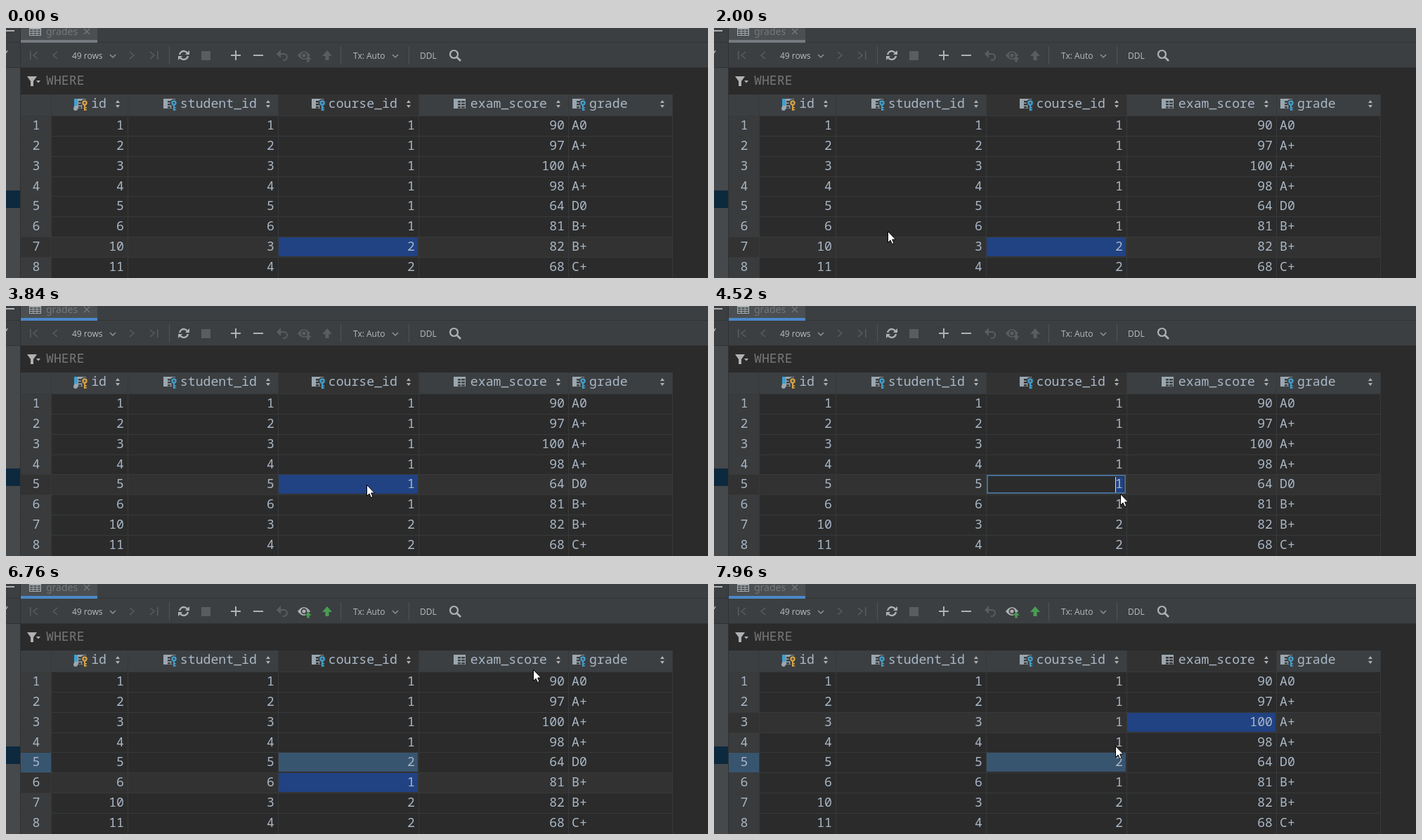
These frames come from a looping animation (999x357 px, 8000 ms). An HTML page with a canvas:

```html
<!DOCTYPE html>
<html lang="en">
<head>
<meta charset="utf-8">
<title>Grades table</title>
<style>
html, body { margin: 0; width: 100%; height: 100%; overflow: hidden; background: #2b2b2b; }
canvas { display: block; }
</style>
</head>
<body>
<canvas id="stage" width="999" height="357"></canvas>
<script>
const c = document.getElementById('stage').getContext('2d');
const LOOP = 8000, STEP = 40;
const MONO = '18.2px "Noto Sans Mono", monospace', CHAR = 10.92;
const UI = '12px "Open Sans", sans-serif';
const TAB = '14px "Noto Sans", sans-serif';
const LIGHT = '#afb1b3', DIM = '#5a5d5f', TEXT = '#a9b7c6', GREEN = '#499c54';
const PANEL = '#3c3f41', GRID = '#2b2b2b', LINE = '#37393a', ACTIVE = '#323232';
const SELECTED = '#214283', CHANGED = '#385570', CARET = '#dddddd';
const GOLD = '#d9a343', BLUE = '#40a0cf', STEEL = '#9aa7b0', TAB_BACK = '#4b4f51';

// Columns run from the previous right edge to their own
const columns = [
  { name: 'id', right: 173, key: GOLD },
  { name: 'student_id', right: 387, key: BLUE },
  { name: 'course_id', right: 587, key: BLUE },
  { name: 'exam_score', right: 800 },
  { name: 'grade', right: 948, key: BLUE, leftAligned: true }
];
columns.forEach((col, i) => col.left = i ? columns[i - 1].right : 64);

const FIRST_COURSE = 6;
const rows = ['90 A0', '97 A+', '100 A+', '98 A+', '64 D0', '81 B+', '82 B+', '68 C+']
  .map((result, i) => i < FIRST_COURSE
    ? [i + 1, i + 1, 1, ...result.split(' ')]
    : [i + 4, i - 3, 2, ...result.split(' ')]);

// Pointer moves: start, duration, target x and y, sideways dip
const APPEAR = 320;
const moves = [
  [APPEAR, 800, 579, 204], [1160, 40, 565, 219], [1200, 800, 247, 290, 70],
  [2040, 120, 247, 243], [2400, 360, 243, 214], [3120, 600, 513, 255],
  [4080, 440, 578, 268], [4720, 80, 599, 271], [6600, 160, 750, 122],
  [6880, 440, 690, 309], [7440, 200, 690, 192], [7720, 240, 571, 231]
];
// Selected cell: start, row, column
const clicks = [[0, 6, 2], [3760, 4, 2], [6240, 5, 2], [7320, 6, 3], [7680, 2, 3]];
const FOCUS = 3760, EDIT = 4080, BLINK = 5120, CLEAR = 5640, TYPED = 5720;
const COMMIT = 6240, PENDING = 6640;
const EDIT_ROW = 4, EDIT_COL = 2;

const rowTop = i => Math.round(125.2 + 28.8 * i);
const ease = k => k * k * (3 - 2 * k);

function box(x, y, w, h, color) {
  c.fillStyle = color;
  c.fillRect(x, y, w, h);
}

function label(s, x, y, color, font = MONO, align = 'left') {
  c.font = font;
  c.textAlign = align;
  c.fillStyle = color;
  c.fillText(s, x, y);
}

function poly(points, color, width) {
  c.beginPath();
  points.forEach(([x, y]) => c.lineTo(x, y));
  if (width) {
    c.strokeStyle = color;
    c.lineWidth = width;
    c.stroke();
  } else {
    c.fillStyle = color;
    c.fill();
  }
}

function arc(x, y, r, from, to, color, width) {
  c.beginPath();
  c.arc(x, y, r, from, to);
  c.strokeStyle = color;
  c.lineWidth = width;
  c.stroke();
}

const chevron = (x, dir) => poly([[x - 3 * dir, 34], [x + 3 * dir, 39], [x - 3 * dir, 44]], DIM, 1.5);
const dropMark = x => poly([[x - 4, 38], [x, 42], [x + 4, 38]], '#8f9294', 1.5);

const arrowUp = (x, y, s, color) => {
  poly([[x - 7 * s, y + s], [x, y - 7 * s], [x + 7 * s, y + s]], color);
  box(x - 2.5 * s, y, 5 * s, 7 * s, color);
};

function tabIcon(x, y) {
  box(x, y, 17, 13, '#a5acb1');
  for (let i = 0; i < 9; i++)
    box(x + 1 + i % 3 * 5.3, y + 4 + Math.floor(i / 3) * 3, 4.3, 2, TAB_BACK);
}

function keyIcon(x, y, color) {
  arc(x, y, 3, 0, 7, PANEL, 5);
  box(x - 2, y + 3, 5, 9, PANEL);
  arc(x, y, 2.6, 0, 7, color, 2.2);
  box(x - 1, y + 3, 2, 8, color);
  box(x + 1, y + 6, 2, 1.5, color);
  box(x + 1, y + 9, 2, 1.5, color);
}

function columnIcon(x, key, back) {
  box(x, 101, 17, 14, STEEL);
  for (let i = 0; i < 3; i++) {
    box(x + 6, 104 + 4 * i, 4, 2.5, back);
    box(x + 11, 104 + 4 * i, 5, 2.5, back);
  }
  if (key) keyIcon(x + 15, 107, key);
  if (key === GOLD) {
    box(x, 101, 5, 10, BLUE);
    arc(x + 2, 115, 1.5, 0, 7, STEEL, 3);
  }
}

function sortMark(x) {
  poly([[x - 3, 107], [x, 103], [x + 3, 107]], LIGHT);
  poly([[x - 3, 110], [x, 114], [x + 3, 110]], LIGHT);
}

function drawWindow(t) {
  box(0, 0, 999, 357, GRID);
  box(0, 0, 999, 56, PANEL);
  box(0, 57, 20, 300, '#45494b');
  box(0, 232, 20, 25, '#0d293e');
  box(20, 0, 1, 357, '#2f3133');
  box(0, 20, 999, 1, '#323435');
  box(0, 56, 999, 1, '#303233');
  box(0, 3, 12, 2, LIGHT);
  poly([[0, 36], [2, 32]], LIGHT, 1.5);

  box(21, 0, 109, 20, TAB_BACK);
  box(21, 17, 109, 4, t < FOCUS ? '#747a80' : '#4a88c7');
  tabIcon(33, -2);
  label('grades', 57, 10, '#74787b', TAB);
  poly([[111, 1], [119, 9]], '#74787b', 1.2);
  poly([[119, 1], [111, 9]], '#74787b', 1.2);
}

function drawToolbar(t) {
  const pending = t >= PENDING;
  [34, 215].forEach(x => box(x, 33, 1.5, 12, DIM));
  [42, 70].forEach(x => chevron(x, -1));
  [179, 208].forEach(x => chevron(x, 1));
  [152, 554].forEach(dropMark);
  [232, 476, 573].forEach(x => box(x, 26, 1, 26, '#515355'));
  label('49 rows', 94, 44, '#bbbbbb', UI);
  label('Tx: Auto', 494, 44, '#bbbbbb', UI);
  label('DDL', 589, 44, '#bbbbbb', UI);

  // Refresh, stop, add, remove
  arc(253, 39, 6, 3.3, 5.8, LIGHT, 2.4);
  arc(253, 39, 6, 0.15, 2.65, LIGHT, 2.4);
  poly([[261, 32], [261, 38], [255, 38]], LIGHT);
  poly([[245, 46], [245, 40], [251, 40]], LIGHT);
  box(278, 33, 13, 13, DIM);
  box(320, 38, 14, 2, LIGHT);
  box(326, 32, 2, 14, LIGHT);
  box(352, 38, 14, 2, LIGHT);

  // Undo, preview, submit
  poly([[385, 37], [391, 31], [391, 43]], DIM);
  box(390, 36, 6, 2, DIM);
  arc(395.5, 41.5, 4.5, -1.6, 1.9, DIM, 2);
  c.beginPath();
  c.moveTo(415, 39);
  c.quadraticCurveTo(424, 27, 433, 39);
  c.quadraticCurveTo(424, 51, 415, 39);
  c.fillStyle = pending ? LIGHT : DIM;
  c.fill();
  arc(424, 39, 3.5, 0, 7, PANEL, 1.8);
  box(426, 40, 8, 9, PANEL);
  arrowUp(430, 44, 0.65, pending ? GREEN : DIM);
  arrowUp(457, 39, 1, pending ? GREEN : DIM);

  // Search and filter
  arc(637.5, 37.5, 5.5, 0, 7, LIGHT, 2.2);
  poly([[641, 41], [647, 47]], LIGHT, 2.6);
  poly([[30, 69], [44, 69], [39, 76], [39, 83], [35, 83], [35, 76]], LIGHT);
  poly([[43, 75], [49, 75], [46, 78.5]], LIGHT);
  label('WHERE', 57, 81, '#787878');
}

function fillCell(row, col, color, inset = 0) {
  const { left, right } = columns[col];
  const x = left + 1 + inset, y = rowTop(row) + 1 + inset;
  box(x, y, right - 1 - inset - x, rowTop(row + 1) - 1 - inset - y, color);
}

function drawEditor(t) {
  fillCell(EDIT_ROW, EDIT_COL, '#466d94');
  fillCell(EDIT_ROW, EDIT_COL, GRID, 2);
  if (t < CLEAR) box(571, 244, 12, 22, SELECTED);
  if (t < BLINK) box(571, 244, 1, 22, CARET);
  if (t >= CLEAR) box(583, 244, 1, 22, CARET);
}

function drawHeader(selCol) {
  box(21, 95, 928, 30, PANEL);
  columns.forEach(({ name, left, right, key, leftAligned }, i) => {
    const back = i === selCol ? ACTIVE : PANEL;
    const x = leftAligned ? left + 30 : right - 30 - name.length * CHAR;
    box(left, 95, right - left, 30, back);
    columnIcon(Math.round(x - 24), key, back);
    label(name, x, 114, TEXT);
    sortMark(right - 14);
  });
}

function cellText(row, col, t) {
  if (row !== EDIT_ROW || col !== EDIT_COL || t < CLEAR) return rows[row][col];
  return t < TYPED ? '' : 2;
}

function drawGrid(t) {
  const [, selRow, selCol] = clicks.filter(k => k[0] <= t).pop();
  drawHeader(selCol);
  box(21, 125, 43, 232, '#393b3c');
  box(21, rowTop(selRow), 928, rowTop(selRow + 1) - rowTop(selRow), ACTIVE);
  rows.forEach((_, i) => box(21, rowTop(i), 928, 1, LINE));
  [64, ...columns.map(col => col.right)].forEach(x => box(x, 95, 1, 262, LINE));

  if (t >= COMMIT) {
    box(21, rowTop(EDIT_ROW) + 1, 43, 28, CHANGED);
    fillCell(EDIT_ROW, EDIT_COL, CHANGED);
  }
  if (t >= EDIT && t < COMMIT) drawEditor(t);
  else fillCell(selRow, selCol, SELECTED);

  rows.forEach((_, i) => {
    const y = rowTop(i) + 20;
    label(i + 1, 43, y, TEXT, MONO, 'center');
    columns.forEach(({ left, right, leftAligned }, j) => leftAligned
      ? label(cellText(i, j, t), left + 5, y, TEXT)
      : label(cellText(i, j, t), right - 5, y, TEXT, MONO, 'right'));
  });
}

function drawPointer(t) {
  if (t < APPEAR) return;
  let x = 522, y = 58;
  for (const [start, length, toX, toY, dip = 0] of moves) {
    const k = ease(Math.min(1, Math.max(0, (t - start) / length)));
    x += (toX - x) * k;
    y += (toY - y) * k + dip * Math.sin(Math.PI * k);
  }
  c.save();
  c.translate(Math.round(x), Math.round(y));
  c.beginPath();
  [[0.5, 0.5], [0.5, 16.5], [4, 13], [6.5, 18.5], [9, 17.5], [6.7, 12], [11.5, 12]]
    .forEach(p => c.lineTo(...p));
  c.closePath();
  c.fillStyle = '#fff';
  c.fill();
  c.strokeStyle = '#000';
  c.lineWidth = 1;
  c.stroke();
  c.restore();
}

const start = performance.now();
function tick() {
  const t = Math.floor((performance.now() - start) % LOOP / STEP) * STEP;
  drawWindow(t);
  drawToolbar(t);
  drawGrid(t);
  drawPointer(t);
  requestAnimationFrame(tick);
}
tick();
</script>
</body>
</html>
```
